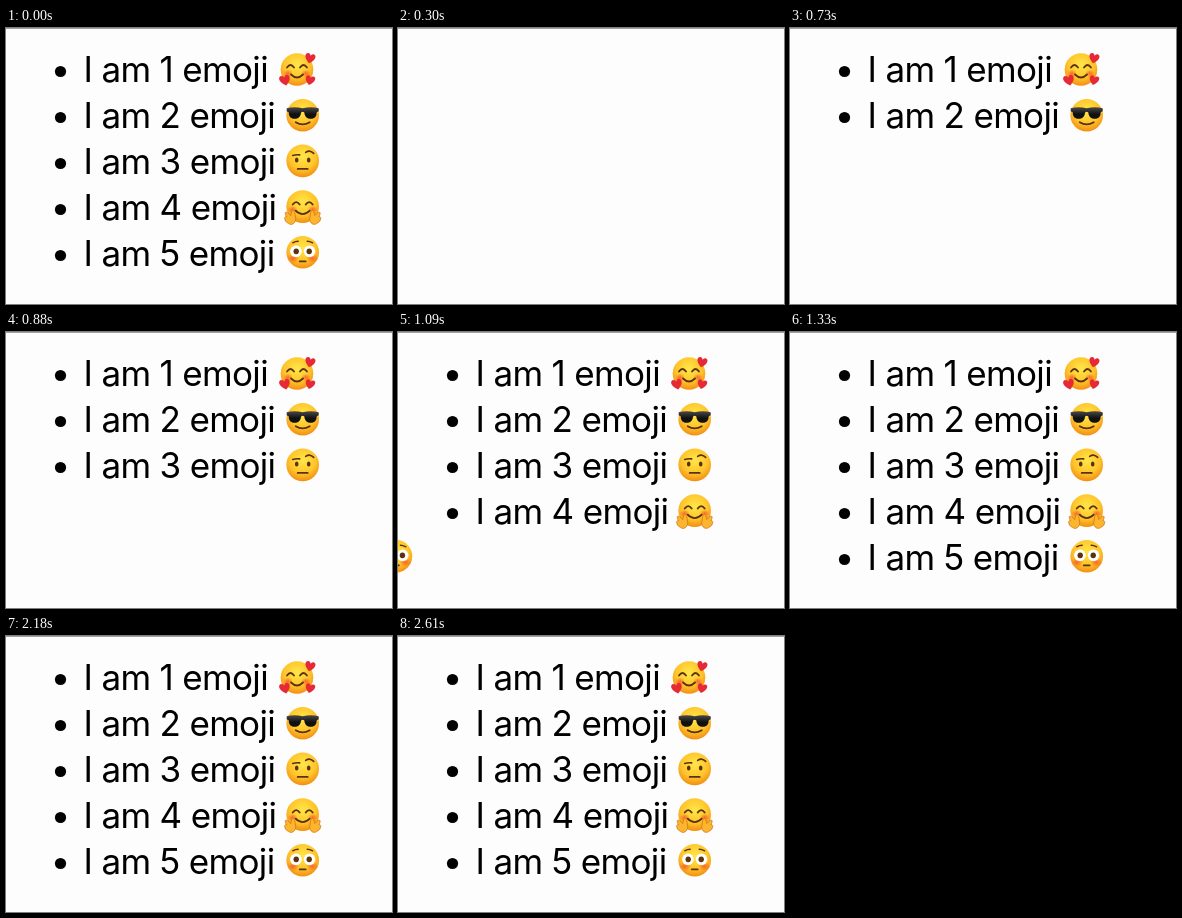
These frames come from a looping animation (386 by 276 pixels, 2.64 s). An HTML page:

```html
<!DOCTYPE html>
<html lang="en">
<head>
<meta charset="utf-8">
<title>Staggered list</title>
<style>
  html, body { margin: 0; width: 100%; height: 100%; overflow: hidden; background: #fdfdfd; }
  svg { display: block; }
  text { font: 35px Inter, Roboto, sans-serif; letter-spacing: -0.67px; }
</style>
</head>
<body>
<svg width="386" height="276" viewBox="0 0 386 276">
  <defs>
    <radialGradient id="skin" cy=".36" r=".66">
      <stop offset="0" stop-color="#ffe748"/>
      <stop offset=".6" stop-color="#ffc52c"/>
      <stop offset="1" stop-color="#f18a10"/>
    </radialGradient>
    <linearGradient id="lens" x2="0" y2="1">
      <stop offset="0" stop-color="#4a4a4c"/>
      <stop offset=".6" stop-color="#111"/>
    </linearGradient>
    <radialGradient id="blush">
      <stop offset="0" stop-color="#f4502f" stop-opacity=".8"/>
      <stop offset="1" stop-color="#f4502f" stop-opacity="0"/>
    </radialGradient>
    <path id="heart" fill="#e62a35" d="M0 5.5C-8-.5-6-5.5-3-5.5-1-5.5 0-3.5 0-3 0-3.5 1-5.5 3-5.5 6-5.5 8-.5 0 5.5Z"/>
    <path id="hand" fill="#fdb52e" stroke="#cf7a18" stroke-width=".8" stroke-linejoin="round"
      d="M-16 9C-19 5-17 3-14 6L-12 8-11 4C-10 2-8 3-8 5L-7 11C-7 16-11 18-14 16Q-18 14-18 11C-18 9-17 9-16 9Z"/>
  </defs>
  <path d="M0 .5H386" stroke="#a0a0a0"/>
</svg>
<script>
const LOOP = 2640, CLEAR = 30, FIRST = 505, STAGGER = 145, SLIDE = 75, DISTANCE = 343, PITCH = 46;
const INK = '#5a3212';

const ellipse = (x, y, rx, ry, fill) =>
  `<ellipse cx="${x}" cy="${y}" rx="${rx}" ry="${ry}" fill="${fill}"/>`;
const line = (d, width = 1.8) =>
  `<path d="${d}" fill="none" stroke="${INK}" stroke-width="${width}" stroke-linecap="round"/>`;
const use = (id, transform) => `<use href="#${id}" transform="${transform}"/>`;
const pair = (x, y, rx, ry, fill) => ellipse(-x, y, rx, ry, fill) + ellipse(x, y, rx, ry, fill);
const face = ellipse(0, 0, 16.3, 16.3, 'url(#skin)');

const emojis = [
  // smiling with hearts
  face + pair(9, 4, 5, 4, 'url(#blush)') +
    line('M-10-2Q-6.5-7-3-2M3-2Q6.5-7 10-2') + line('M-6 5Q0 11 6 5') +
    use('heart', 'translate(13 -11) rotate(12) scale(.9)') +
    use('heart', 'translate(-12 11) rotate(-14) scale(.95)') +
    use('heart', 'translate(13 11) rotate(14) scale(.85)'),
  // sunglasses
  face + line('M-7 7Q0 11.500 7 7') +
    `<path fill="url(#lens)" d="M-16-6Q-8-8 0-6 8-8 16-6V-3L14-2C14 4 10 5 7 4.500 3 4 2 1 1.500-2Q0-3-1.500-2C-2 1-3 4-7 4.500-10 5-14 4-14-2L-16-3Z" transform="translate(0 -1)"/>`,
  // raised eyebrow
  face + pair(6, -1, 1.8, 2.5, INK) +
    line('M-10-5.500Q-6.500-6.500-3-6M3-8.500Q7-11.500 11-7.500', 1.6) + line('M-5 8H5'),
  // hugging
  face + pair(10, 3, 5, 4, 'url(#blush)') +
    line('M-10-2Q-6.5-7-3-2M3-2Q6.5-7 10-2') + line('M-7 4Q0 11 7 4') +
    use('hand', 'translate(0 1)') + use('hand', 'translate(0 1) scale(-1 1)'),
  // flushed
  face + pair(9.5, 6, 6, 4.5, 'url(#blush)') +
    pair(6.8, -1, 5.8, 5.8, '#fff') + pair(6.5, -1, 2.7, 2.9, INK) +
    line('M-10-9.5Q-7-11-4.500-11M4.500-11Q7-11 10-9.5', 1.4) + line('M-3 9H3'),
];

const svg = document.querySelector('svg');
const rows = emojis.map((emoji, i) => {
  const row = document.createElementNS('http://www.w3.org/2000/svg', 'g');
  const y = i * PITCH;
  row.innerHTML = ellipse(54.5, 43.5 + y, 5.6, 5.6, '#000') +
    `<text x="77.5" y="${54 + y}">I am ${i + 1} emoji</text>` +
    `<g transform="translate(${i ? 296.7 : 291} ${41.5 + i * 45.7})">${emoji}</g>`;
  return svg.appendChild(row);
});

function draw() {
  const now = performance.now() % LOOP;
  const time = 10 + 30 * Math.floor((now - 9) / 30); // motion advances in 30 ms ticks
  rows.forEach((row, i) => {
    const p = Math.min(1, Math.max(0, (time - FIRST - i * STAGGER) / SLIDE));
    const x = now < CLEAR ? 0 : -DISTANCE * (1 - p) ** 2;
    row.setAttribute('transform', `translate(${x} 0)`);
  });
  requestAnimationFrame(draw);
}
draw();
</script>
</body>
</html>
```
